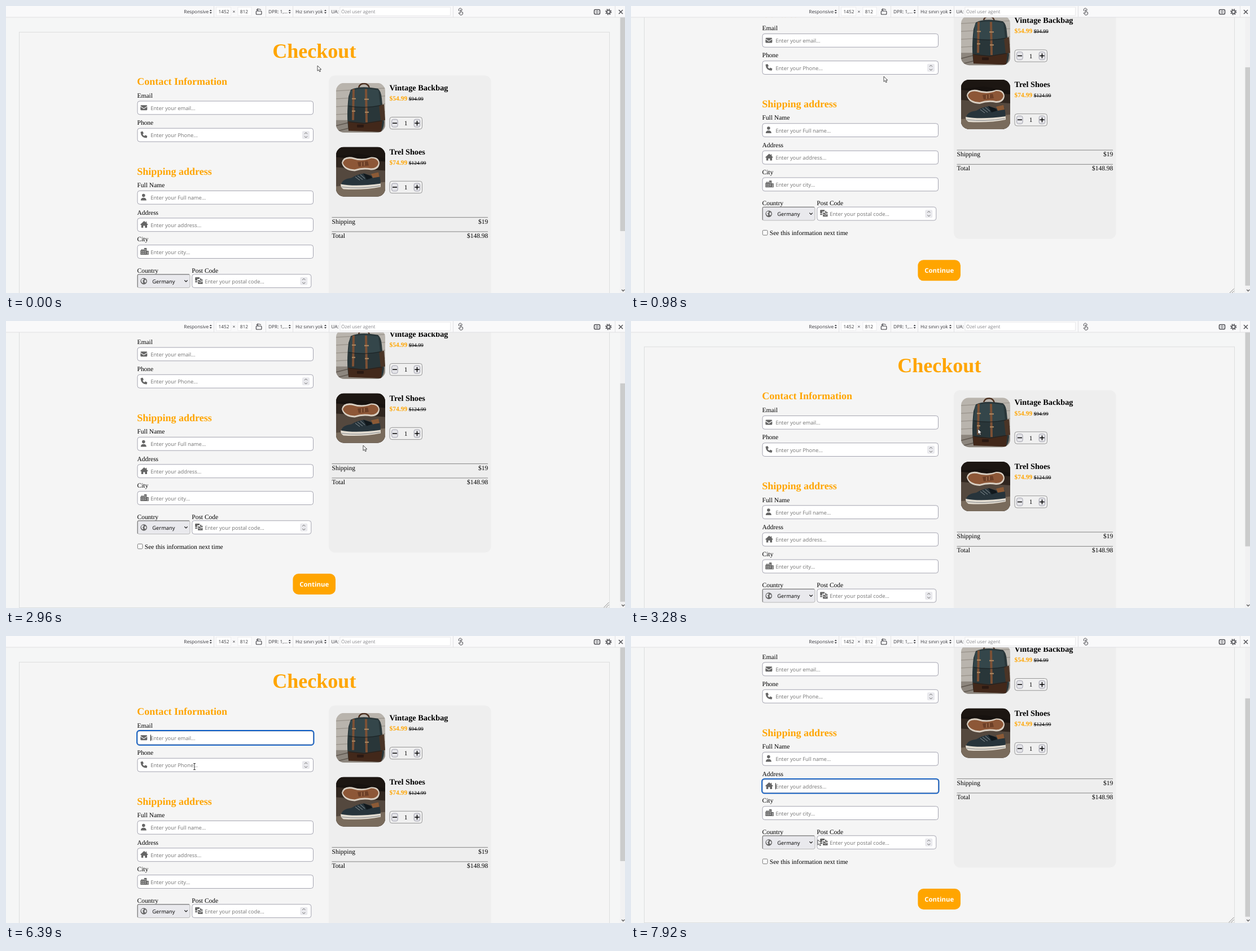
These frames come from a looping animation (1097 by 510 pixels, 7.99 s). An HTML page:

```html
<!DOCTYPE html>
<html lang="en">
<head>
<meta charset="utf-8">
<title>Checkout</title>
<style>
  html, body { margin: 0; height: 100%; overflow: hidden; background: #f5f6f6; }
  svg { display: block; width: 100vw; height: 100vh; text-rendering: geometricPrecision; }
  .serif { font-family: "Liberation Serif", serif; }
  .sans { font-family: "Open Sans", "Noto Sans", sans-serif; }
  .bold { font-weight: 700; }
  .old { text-decoration: line-through; }
  .line { fill: none; stroke: #4a4a4f; }
  #button rect { fill: #ffa500; }
  #button text { fill: #fff; }
  #button.hover rect { fill: #ffca6b; filter: drop-shadow(0 0 2px #777); }
  #button.hover text { fill: #fdd68e; }
</style>
</head>
<body>
<svg id="stage" viewBox="0 0 1097 510"></svg>
<script>
const LOOP = 7990;
const ORANGE = '#ffa500', GREY = '#666', EDGE = '#8f8f9d';

// ---------- drawing helpers ----------
const text = (x, y, str, size, cls = 'serif', fill = '#000', anchor = 'start') =>
  `<text x="${x}" y="${y}" font-size="${size}" class="${cls}" fill="${fill}" text-anchor="${anchor}">${str}</text>`;
const rect = (x, y, w, h, fill, r = 0, stroke = 'none', sw = 0.8) =>
  `<rect x="${x}" y="${y}" width="${w}" height="${h}" rx="${r}" fill="${fill}" stroke="${stroke}" stroke-width="${sw}"/>`;
const path = (d, fill = GREY, extra = '') => `<path d="${d}" fill="${fill}" ${extra}/>`;
const line = (d, stroke, sw = 1) => path(d, 'none', `stroke="${stroke}" stroke-width="${sw}"`);
const circle = (x, y, r, fill = GREY) => `<circle cx="${x}" cy="${y}" r="${r}" fill="${fill}"/>`;
const at = (x, y, body) => `<g transform="translate(${x} ${y})">${body}</g>`;

// ---------- form ----------
const icons = {
  mail: path('M0 3.5Q0 2 1.5 2H10.5Q12 2 12 3.5L6 7.5ZM0 4.8L6 8.8L12 4.8V9.5Q12 11 10.5 11H1.5Q0 11 0 9.5Z'),
  phone: path('M.8 1L3.4.3Q4 .2 4.3.8L5.4 3.4Q5.6 4 5.1 4.4L3.9 5.4Q5 7.6 7 8.5L8 7.3Q8.4 6.8 9 7L11.5 8.2Q12.1 8.5 12 9.1L11.3 11.4Q11.1 12 10.5 12Q1 11.5.2 1.9Q.2 1.2.8 1Z'),
  user: circle(5.5, 3, 2.8) + path('M.5 12Q.5 7.2 5.5 7.2T10.5 12Z'),
  home: path('M6.5 0L9.5 2.6V1H11V4L13.2 6V7H11.7V12H8V8.5H5V12H1.5V7H0V6Z'),
  city: path('M0 4H1.5V2H3V4H4V2H5.5V4H6.5V0H11V5H14.5V12H0Z') +
    [[2, 6], [2, 9], [5, 6], [5, 9], [8, 2.5], [8, 5.5], [8, 8.5], [11.8, 7], [11.8, 9.5]]
      .map(([x, y]) => rect(x, y, 1.3, 1.3, '#fff')).join(''),
  globe: circle(6, 6, 5.8) + path('M2 3Q4 1.2 6 2L5.5 4L3.5 5.5L5 7L4.5 9.5Q1.5 8 1.5 5ZM8 3L10.2 4.5L10.5 7L8.5 9L7 6.5Z', '#e9e9ed'),
  post: path('M1 0H8V3H4V6H0V1Q0 0 1 0ZM9 2H11V4H13.5V6H9ZM0 7H4V9H0ZM5 5H8L9.5 7.2L13.5 6.8V12H5Z') +
    line('M5 7.2L9.2 9.5L13.5 7.2', '#fff', 0.8),
};
const fields = [
  { x: 233, y: 169, w: 311.5, label: 'Email', icon: 'mail', hint: 'Enter your email...' },
  { x: 233, y: 217.3, w: 311.5, label: 'Phone', icon: 'phone', hint: 'Enter your Phone...', spin: 1 },
  { x: 233, y: 328.4, w: 311.5, label: 'Full Name', icon: 'user', hint: 'Enter your Full name...' },
  { x: 233, y: 376.9, w: 311.5, label: 'Address', icon: 'home', hint: 'Enter your address...' },
  { x: 233, y: 424.7, w: 311.5, label: 'City', icon: 'city', hint: 'Enter your city...' },
  { x: 329.8, y: 476.8, w: 211, label: 'Post Code', icon: 'post', hint: 'Enter your postal code...', spin: 1, gap: 3 },
];
const FIELD_H = 23.8;

function drawField(f) {
  const right = f.x + f.w;
  return text(f.x - 0.5, f.y - 6.3 + (f.gap || 0), f.label, 11.48) +
    rect(f.x, f.y, f.w, FIELD_H, '#fff', 4, EDGE) +
    at(f.x + 5.3, f.y + 5.2, icons[f.icon]) +
    text(f.x + (f.gap ? 22.4 : 23.2), f.y + 16, f.hint, 9.35, 'sans', '#757575') +
    (f.spin ? rect(right - 19.5, f.y + 5, 13, 14, '#e9e9ed', 2) +
      line(`M${right - 15.5} ${f.y + 10}l2.5 -2.5l2.5 2.5m0 4.2l-2.5 2.5l-2.5 -2.5`, '#555', 0.9) : '');
}

const country = text(232.5, 473.7, 'Country', 11.48) +
  rect(233, 476.8, 93, FIELD_H, '#e9e9ed', 3, '#aaa') +
  line('M233.2 500V478Q233.2 477 235 477H325', '#666', 0.9) +
  at(238.2, 483, icons.globe) +
  text(259.3, 492.7, 'Germany', 9.35, 'sans') +
  line('M316.3 487.3l2.7 2.7l2.7 -2.7', '#111', 1.2);

// ---------- order summary ----------
const bag = rect(0, 0, 88, 89, '#b9b4ad') +
  [14, 28, 42, 56, 70].map(y => line(`M0 ${y}L88 ${y - 5}`, '#98928a', 1.2)).join('') +
  rect(0, 66, 88, 23, '#8d867e') + line('M0 76L24 70M0 86L24 80', '#5f574f', 1.5) +
  line('M40 8Q42 1 50 1Q58 2 59 10', '#4b2f1f', 2.4) +
  path('M26 12Q42 4 74 10Q80 14 81 28L85 70Q84 84 78 87L22 84Q18 60 22 24Z', '#293639') +
  path('M25 14Q44 7 75 13L78 39Q52 45 22 40Z', '#34464a') +
  path('M21 68L50 71L82 66L80 87L22 85Z', '#42281a') +
  path('M76 40L85 38L87 66L79 67Z', '#4a3426') +
  line('M31 11L30 66M53 11L54 70', '#7d5135', 4) +
  line('M28 28H35M50 29H58M28 50H34M51 52H58', '#b08a63', 2) +
  line('M22 41Q50 46 79 40M23 69L50 72L81 67', '#1b2224', 1) +
  rect(37, 74, 12, 5, '#2a1912', 1);
const shoes = rect(0, 0, 88, 89, '#17120f') +
  path('M0 33L88 40V89H0Z', '#54483e') + path('M0 70L88 62V89H0Z', '#796b5c') +
  path('M0 18L88 26V42L0 36Z', '#30261f') + path('M0 0H88V20L40 12L0 16Z', '#1c1612') +
  path('M10 28Q12 16 28 18Q46 24 62 18Q76 17 77 29Q76 41 62 41Q48 38 33 43Q13 42 10 28Z', '#d9cfc2') +
  path('M12 28Q15 19 28 21Q46 27 62 20Q74 20 75 29Q73 38 62 38Q47 35 33 40Q15 39 12 28Z', '#8d5737') +
  path('M38 27L56 25L58 33L40 35Z', '#6c3f27') + line('M45 27V34M50 26V33', '#c28d62', 1) +
  path('M9 67Q10 57 27 55Q38 48 50 47L61 51L76 48Q80 59 78 70L12 74Z', '#27343b') +
  path('M62 48L75 45L77 53L65 55Z', '#8b5a36') +
  path('M48 47L61 51L64 55L54 58Z', '#11181c') +
  line('M34 53L42 59M38 51L47 58M43 49L51 56', '#8d969a', 1) +
  path('M8 66Q35 71 79 65V71Q50 77 13 75Q8 72 8 66Z', '#e2dcd1') +
  line('M10 71Q40 75 78 69', '#59616a', 0.7);

const items = [
  { y: 136.8, photo: bag, name: 'Vintage Backbag', price: '$54.99', old: '$94.99', oldX: 713.8 },
  { y: 250.6, photo: shoes, name: 'Trel Shoes', price: '$74.99', old: '$124.99', oldX: 713.8 },
];
const stepper = y => rect(680, y, 57.5, 21.3, '#f0f0f0', 4, '#808080') +
  [683.6, 723.1].map(x => rect(x, y + 3.8, 10.6, 13.8, '#e4e4e8', 3, EDGE)).join('') +
  line(`M685 ${y + 10.7}h8M724.3 ${y + 10.7}h8.4m-4.2 -4.2v8.4`, '#000', 1.5) +
  text(708.6, y + 14.7, '1', 11.5, 'serif', '#000', 'middle');
const drawItem = i => at(585, i.y, `<g clip-path="url(#photo)">${i.photo}</g>`) +
  text(679.5, i.y + 13, i.name, 14.3, 'serif bold') +
  text(679.5, i.y + 31.3, i.price, 11.5, 'serif bold', ORANGE) +
  text(i.oldX, i.y + 31.3, i.old, 9.45, 'serif old') + stepper(i.y + 60.7);
const total = (y, name, sum) => line(`M577.5 ${y}H854`, '#777', 0.9) +
  text(577.5, y + 10.8, name, 11.5) + text(854.3, y + 10.8, sum, 11.5, 'serif', '#000', 'end');

const page = rect(23.5, 46.5, 1046, 585, '#f5f5f5', 0, '#dcdede', 1) +
  line('M1059.5 631l9 -9M1063.5 631l5 -5', '#888', 1) +
  text(546.3, 92, 'Checkout', 36.1, 'serif bold', ORANGE, 'middle') +
  text(232.3, 140, 'Contact Information', 18.05, 'serif bold', ORANGE) +
  text(232.3, 299.6, 'Shipping address', 18.05, 'serif bold', ORANGE) +
  fields.map(drawField).join('') + country +
  rect(233.3, 518.2, 8.6, 8.6, '#fff', 1.5, '#777', 1) +
  text(245.8, 526.9, 'See this information next time', 11.48) +
  rect(572, 123.5, 287.5, 410, '#eee', 11) + items.map(drawItem).join('') +
  total(375.7, 'Shipping', '$19') + total(401, 'Total', '$148.98') +
  `<g id="button">${rect(508.4, 571, 75.6, 37, ORANGE, 10)}${text(546.2, 594, 'Continue', 11.4, 'sans bold', '#fff', 'middle')}</g>` +
  `<g id="focus">${rect(-1, -1, 313.5, FIELD_H + 2, 'none', 4.5, '#0a5bc4', 1.8)}${line('M23.5 6.5v11', '#000', 0.9)}</g>`;

// ---------- browser chrome ----------
const label = (x, str, fill = '#38383d') => text(x, 13, str, 8.3, 'sans', fill);
const sorter = x => path(`M${x} 9l2 -2.6l2 2.6zM${x} 11l2 2.6l2 -2.6z`, '#38383d');
const bar = rect(0, 0, 1097, 20, '#f9f9fa') + line('M0 20H1097', '#e0e0e2') +
  line('M368.5 0V20M460.5 0V20M508.5 0V20M572.5 0V20M792.5 0V20M1079.5 0V20', '#e2e2e4') +
  rect(372.5, 2, 26, 15, '#fff', 0, '#e8e8ea') + rect(411, 2, 24, 15, '#fff', 0, '#e8e8ea') +
  rect(592, 2, 195.5, 15, '#fff', 0, '#e4e4e6') +
  label(315.3, 'Responsive') + label(376.5, '1452') + label(401.5, '×') + label(414.8, '812') +
  label(465, 'DPR: 1,...') + label(513, 'Hız sınırı yok') + label(576.3, 'UA:') +
  label(594, 'Özel user agent', '#85858a') + [360.8, 500.7, 564].map(sorter).join('') +
  `<g class="line">${rect(443.3, 9, 9.6, 6, 'none', 1, '#38383d', 1.1)}
   <path d="M444 7Q448 4 452 6.5M446.5 4L444 7L447.5 8"/>
   <path d="M803 9A3 3 0 1 1 808 8M805 13V7.5Q806 6.5 806.8 7.5V10.5L809.5 11.2V14Q809 16 807 16H805L802 12.5Q803 11.5 805 13"/>
   <rect x="1042.5" y="6.5" width="10" height="8" rx="1.5" stroke-width="1.5"/><circle cx="1047.5" cy="10.5" r="1.8"/>
   <circle cx="1067.7" cy="10.5" r="3" stroke-width="1.6"/>
   <circle cx="1067.7" cy="10.5" r="4.8" stroke-width="1.7" stroke-dasharray="1.8 1.97"/>
   <path d="M1086 7l7 7m0 -7l-7 7" stroke-width="1.4"/></g>`;
const scrollbar = rect(1088.5, 20, 9, 490, '#f1f1f2') +
  `<rect id="thumb" x="1088.5" width="8.5" height="388" fill="#cbcccc"/>` +
  rect(1088, 499.5, 9, 11, '#f1f1f2') + line('M1091.2 504l2.5 2.6l2.5 -2.6', '#505050', 1.2);

const outline = 'stroke="#222" stroke-width=".8" stroke-linejoin="round"';
const cursors = {
  arrow: path('M0 0V9.3L2.2 7.3L3.8 10.8L5.4 10.1L3.9 6.7H6.8Z', '#fff', outline),
  hand: path('M-1 1Q0 -.6 1 1V5Q2 4.2 2.8 5.2Q3.8 4.6 4.4 5.6Q6 5.4 6 6.8V9.5Q5.6 11.5 4.8 13.2H-.2Q-1 11.2 -3.2 8.6Q-3.2 7 -1 8.3Z', '#fff', outline),
  beam: line('M-2 -5.5H2M0 -5.5V5.5M-2 5.5H2', '#222', 0.9),
};

const stage = document.getElementById('stage');
stage.innerHTML = `<clipPath id="photo">${rect(0, 0, 87, 88, '#000', 14)}</clipPath>` +
  `<g id="page">${page}</g>${scrollbar}${bar}` +
  Object.entries(cursors).map(([id, body]) => `<g id="${id}">${body}</g>`).join('');

// ---------- motion ----------
const scrollKeys = [[0, 0], [640, 0], [800, 72], [900, 108], [980, 119.6], [1060, 122], [3040, 122],
  [3120, 64], [3200, 14], [3280, 0.6], [3360, 0], [7690, 0], [7760, 52], [7840, 106], [7920, 122]];
const pointerKeys = [[280, 552, 106], [640, 510, 116], [980, 448, 125], [1140, 446, 148], [1450, 310, 300],
  [1620, 236, 400], [1800, 400, 490], [1980, 568, 494], [2060, 562, 478], [2210, 556.5, 461],
  [2450, 556.5, 461], [2640, 590, 420], [2820, 631, 350], [2960, 633, 221], [3040, 633, 221],
  [3280, 615, 192], [3600, 560, 150], [3880, 430, 95], [4100, 345, 140], [4350, 500, 235],
  [4580, 713, 254], [4730, 677, 204], [4870, 677, 204], [5120, 732, 210], [5260, 732, 210],
  [5580, 600, 300], [5800, 410, 312], [5960, 322, 240], [6080, 330, 185], [6160, 331, 185],
  [6390, 334, 232], [6530, 336, 236], [6640, 336, 236], [6900, 340, 338], [7050, 341, 342],
  [7300, 348, 386], [7450, 350, 389], [7600, 354.5, 404], [7680, 354.5, 404], [7840, 340, 385], [7920, 331, 362]];
// [start, field index]; -1 means nothing is focused
const focusKeys = [[0, -1], [6200, 0], [6530, 1], [7000, 2], [7450, 3]];

function sample(keys, t) {
  const next = keys.findIndex(k => k[0] > t);
  if (next === 0) return keys[0].slice(1);
  if (next < 0) return keys.at(-1).slice(1);
  const a = keys[next - 1], b = keys[next], p = (t - a[0]) / (b[0] - a[0]);
  return a.slice(1).map((v, i) => v + (b[i + 1] - v) * p);
}
const inside = (x, y, l, t, w, h) => x >= l && x <= l + w && y >= t && y <= t + h;
const el = id => document.getElementById(id);
const move = (id, x, y) => el(id).setAttribute('transform', `translate(${x} ${y})`);

function draw(t) {
  const [scroll] = sample(scrollKeys, t), [x, y] = sample(pointerKeys, t), py = y + scroll;
  move('page', 0, -scroll);
  el('thumb').setAttribute('y', 12 + scroll * 0.81);

  const onButton = inside(x, py, 508.4, 571, 75.6, 37);
  const onStepper = items.some(i => [683.6, 723.1].some(l => inside(x, py, l, i.y + 64.5, 10.6, 13.8)));
  const onField = fields.some(f => inside(x, py, f.x + 20, f.y, f.w - 20, FIELD_H));
  el('button').classList.toggle('hover', onButton);
  const kind = onButton || onStepper ? 'hand' : onField ? 'beam' : 'arrow';
  for (const id in cursors) el(id).style.display = id === kind ? '' : 'none';
  move(kind, x, y);

  const active = fields[focusKeys.findLast(k => k[0] <= t)[1]];
  el('focus').style.display = active ? '' : 'none';
  if (active) move('focus', active.x, active.y);
}

const start = performance.now();
function tick() {
  draw((performance.now() - start) % LOOP);
  requestAnimationFrame(tick);
}
tick();
</script>
</body>
</html>
```
